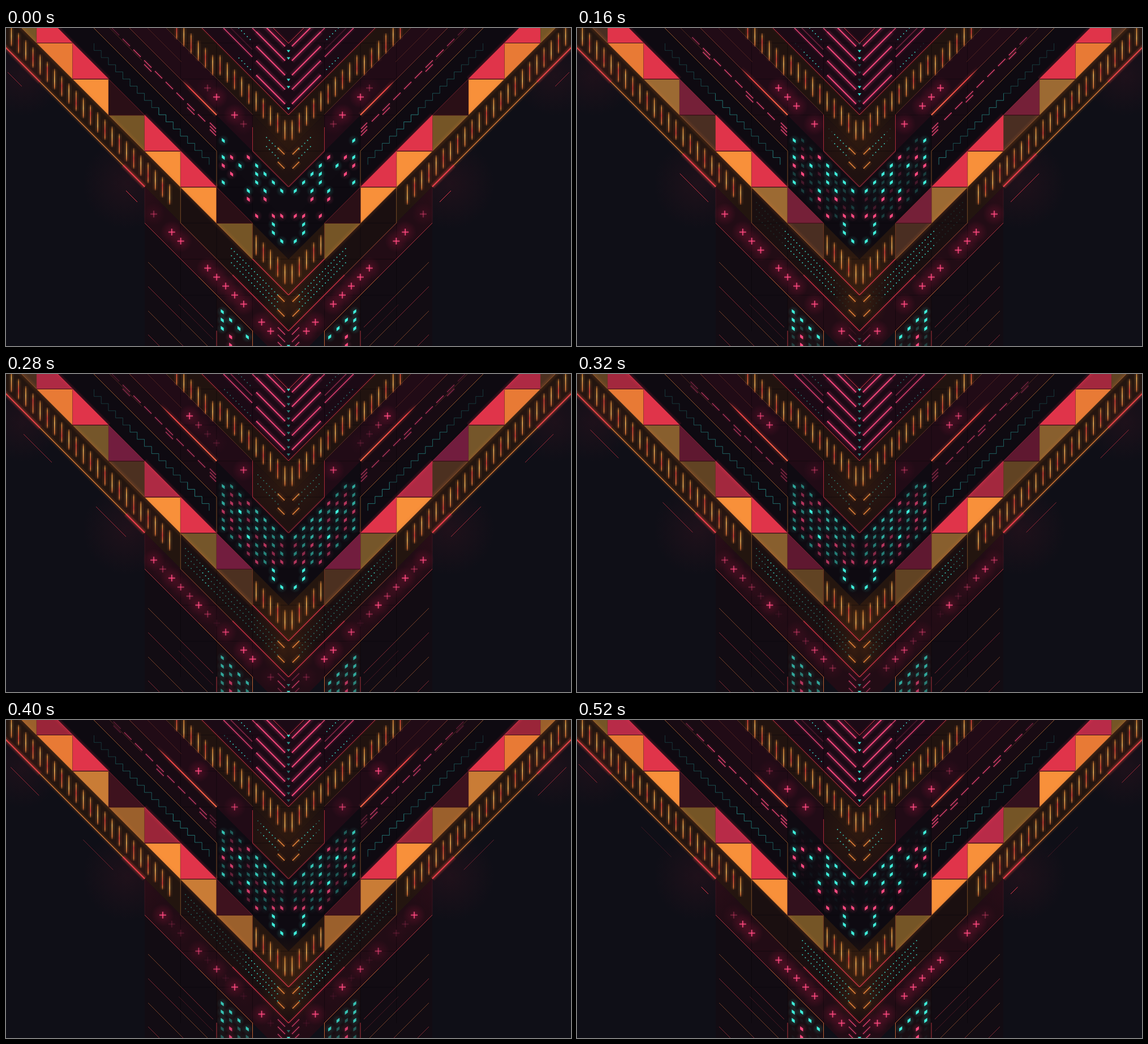
An HTML page with a canvas that plays this animation: 998x561 px, repeating every 560 ms.

```html
<!DOCTYPE html>
<html>
<head>
<meta charset="utf-8">
<style>
html, body { margin: 0; width: 100%; height: 100%; overflow: hidden; background: #0f0f17; }
canvas { display: block; }
</style>
</head>
<body>
<canvas id="stage" width="998" height="561"></canvas>
<script>
const ctx = document.getElementById('stage').getContext('2d');
const LOOP = 560, TILE = 63.55, STEP = TILE / 5, SPEED = 106 / LOOP;
const TIMES = [0, 80, 160, 280, 360, 440, 520, LOOP];
const PINK = '#ff4a80', RED = '#e83a4c', ORANGE = '#e8853a', CYAN = '#3ff0dc', TEAL = '#2c9c98';
const AMBER = '#f8903a', ROSE = '#e0344a';
let t = 0;

const clamp = v => Math.max(0, Math.min(1, v));
const mod = (a, n) => ((a % n) + n) % n;
const gx = c => 499 - TILE * (7 - c) + TILE * 0;
const gy = r => 26.5 + TILE * r;
const rgb = hex => [1, 3, 5].map(i => parseInt(hex.slice(i, i + 2), 16));

// Interpolates seven key values over the loop
function keyed(values, blend) {
  let i = 0;
  while (t >= TIMES[i + 1]) i++;
  return blend(values[i], values[(i + 1) % 7], (t - TIMES[i]) / (TIMES[i + 1] - TIMES[i]));
}
const level = values => keyed(values, (a, b, k) => a + (b - a) * k);
const tint = values => keyed(values, (a, b, k) => {
  const from = rgb(a), to = rgb(b);
  return `rgb(${from.map((v, i) => Math.round(v + (to[i] - v) * k))})`;
});

// Full between a and b, fading linearly outside, cyclic
function pulse(a, b, fade = 110) {
  return Math.max(...[t, t + LOOP].map(u => clamp(1 - Math.max(a - u, u - b, 0) / fade)));
}

function line(x1, y1, x2, y2, color, width = 1, alpha = 1, glow = 0) {
  if (alpha <= 0.01) return;
  ctx.strokeStyle = color;
  ctx.beginPath();
  ctx.moveTo(x1, y1);
  ctx.lineTo(x2, y2);
  for (let w = glow; w > 2; w -= 3) {
    ctx.globalAlpha = alpha * 0.07;
    ctx.lineWidth = width + w;
    ctx.stroke();
  }
  ctx.globalAlpha = alpha;
  ctx.lineWidth = width;
  ctx.stroke();
  ctx.globalAlpha = 1;
}
const diag = (off, x1, x2, ...style) => line(x1, x1 + off, x2, x2 + off, ...style);

function shape(points, color, alpha = 1) {
  ctx.globalAlpha = alpha;
  ctx.fillStyle = color;
  ctx.beginPath();
  points.forEach(([x, y]) => ctx.lineTo(x, y));
  ctx.fill();
  ctx.globalAlpha = 1;
}
function halo(x, y, r, color, alpha) {
  const g = ctx.createRadialGradient(x, y, 0, x, y, r);
  g.addColorStop(0, color);
  g.addColorStop(1, color + '00');
  ctx.globalAlpha = alpha;
  ctx.fillStyle = g;
  ctx.fillRect(x - r, y - r, 2 * r, 2 * r);
  ctx.globalAlpha = 1;
}
const band = (top, bottom, x1, x2, color) =>
  shape([[x1, x1 + top], [x2, x2 + top], [x2, x2 + bottom], [x1, x1 + bottom]], color);

function backdrop() {
  band(-600, 0, -10, 499, '#0f0b12');
  band(-155, -91, -10, 499, '#0e0a11');
  band(-218, -155, -10, 372, '#180b13');
  band(-283, -218, -10, 436, '#210b16');
  band(-346, -283, -10, 499, '#21130f');
  band(-600, -346, -10, 499, '#1b0a15');
  band(-283, -219, 436, 499, '#1f1110');
  band(-27, 35, -10, 308, '#23150f');
  band(-27, 35, 308, 499, '#1a0f10');
  band(-91, -28, 435, 499, '#25160f');
  band(35, 99, 245, 499, '#220c15');
  band(99, 330, 245, 372, '#120c13');
  band(99, 330, 372, 436, '#180d12');
  halo(215, 275, 80, '#601828', 0.2);
  halo(30, 85, 70, '#601828', 0.18);
  halo(490, 200, 60, '#603010', 0.2);
  halo(490, 435, 60, '#703810', 0.25);
  halo(490, 490, 40, '#703810', 0.3);
  for (let c = 4; c < 7; c++) {
    for (let r = 0; r < 8; r++) {
      line(gx(c), gy(r), gx(c + 1), gy(r), '#07060a', 1, 0.45);
      line(gx(c), gy(r), gx(c), gy(r + 1), '#07060a', 1, 0.45);
    }
  }
}

function triangles() {
  const olive = tint(['#755526', '#4a2e22', '#4a2e22', '#4c3020', '#755526', '#c06a32', '#755526']);
  const gold = tint([AMBER, AMBER, '#9c6a33', '#75562a', '#9a6731', AMBER, AMBER]);
  const wine = tint(['#2a0f16', '#4b1022', '#752038', '#721d3e', '#4c1222', '#30121a', '#33111d']);
  const blush = tint([ROSE, ROSE, ROSE, '#ae2a44', '#982538', '#9b2539', '#b82b48']);
  const lower = [olive, '#e87a35', gold, olive, AMBER, gold, olive];
  const upper = [blush, ROSE, wine, blush, ROSE, wine];
  lower.forEach((color, i) => {
    const x = gx(i - 1), y = gy(i - 1);
    shape([[x, y], [x + TILE, y], [x + TILE, y + TILE]], color);
    line(x, y, x + TILE, y + TILE, ORANGE, 1, 0.55, 10);
    line(x, y, x + TILE, y, '#3a1a14', 1.2, 0.9);
    line(x + TILE, y, x + TILE, y + TILE, '#6a3420', 1.2, 0.8);
  });
  upper.forEach((color, i) => {
    const x = gx(i), y = gy(i - 1);
    shape([[x, y], [x, y + TILE], [x + TILE, y + TILE]], color);
    line(x, y, x + TILE, y + TILE, RED, 1, color === wine ? 0.4 : 0.9, color === wine ? 0 : 9);
    line(x, y + TILE, x + TILE, y + TILE, '#3a1018', 1.2, 0.9);
  });
}

function tick(x, top) {
  const mid = 0.3 + 0.4 * mod(x * 0.37 + t / LOOP, 1);
  const g = ctx.createLinearGradient(0, top, 0, top + 37);
  g.addColorStop(0, '#e8853a40');
  g.addColorStop(0.15, '#e8903a');
  g.addColorStop(mid, Math.round(x / STEP) % 2 ? '#ffc060' : '#e8403c');
  g.addColorStop(0.88, '#f0803a');
  g.addColorStop(1, '#f0803a40');
  line(x, top, x, top + 37, g, 1.5, 0.95, 8);
}
function ticks() {
  for (let x = 9.5; x < 292; x += STEP) tick(x, x - 14);
  for (let x = 301.5; x < 370; x += STEP) tick(x, x - 318);
  for (let x = 378.2; x < 495; x += STEP) tick(x, x - 331);
  for (let x = 441.8; x < 495; x += STEP) tick(x, x - 77);
}

function outlines() {
  diag(35, -10, 245, ORANGE, 1.5, 0.9, 7);
  diag(35, -10, 60, RED, 2, 0.8, 9);
  diag(35, level([207, 198, 187, 212, 208, 205, 207]), 245, RED, 2, 1, 9);
  diag(-155, 150, 372, '#b06a34', 1, 0.8);
  diag(-183, 178, 240, '#a0562e', 1, 0.4);
  diag(-218, 215, 372, '#b8543a', 1, 0.6);
  diag(-250, 245, 310, '#a04a30', 1, 0.35);
  diag(-283, 280, 436, '#8a4830', 1, 0.55);
  diag(-346, 340, 499, RED, 1, 0.85, 4);
  diag(-472, 470, 499, RED, 1, 0.9, 5);
  line(372, 217, 372, 280, '#b06a34', 1, 0.7);
  line(435.5, level([175, 153, 153, 153, 153, 165, 175]), 435.5, 217, RED, 1, 0.7);
  diag(-218.5, 435.5, 499, RED, 1, 0.9, 4);
  line(435.5, 344, 435.5, 407, '#b04a34', 1, 0.8);
  diag(-28, 435.5, 499, RED, 1.2, 0.95, 5);
  line(308.3, 280, 308.3, 344, '#a86a34', 1, 0.7);
  diag(-27, 308, 436, ORANGE, 1, 0.3);
  diag(35.5, 308.3, 400, '#c0603a', 1, 0.8);
  diag(35.5, 400, 499, RED, 1.2, 0.9, 5);
  line(245, 280, 245, 344, '#8a2838', 1, 0.25);
  diag(99, 245, 340, '#c83c48', 1, 0.85);
  diag(99, 340, 435.5, '#d8703a', 1, 0.85);
  line(435.5, 534, 435.5, 561, '#d8703a', 1, 0.85);
  line(372, 534, 372, 561, '#c83c48', 1, 0.85);
  [162, 205, 248, 290].forEach((off, i) => {
    diag(off, 251, 310, i % 2 ? '#c83c48' : '#b8643a', 1, 0.6);
    diag(off, 310, 366, i % 2 ? '#b8643a' : '#c83c48', 1, 0.6);
  });
  diag(183, 305, 366, '#b03040', 1, 0.35);
}

function runners() {
  // Thin red dashes sliding up the outer edge
  for (const head of [212 - SPEED * t, 318 - SPEED * t]) {
    if (head < 232) diag(75, head, Math.min(232, head + 53), RED, 1, clamp((head - 90) / 110));
  }
  const u = t < 200 ? t + LOOP : t, left = Math.max(3, 84 - SPEED * u), right = 134 - SPEED * u;
  if (right > left) diag(75, left, right, RED, 1, 0.6);

  const head = t < 380 ? 312 - 0.14 * t : 259 + (t - 380) * 0.378;
  const g = ctx.createLinearGradient(head, 0, 372, 0);
  g.addColorStop(0, '#ff4a4000');
  g.addColorStop(0.2, '#f04444');
  g.addColorStop(1, '#ff6a48');
  diag(-218.5, Math.min(312, head), 372, g, 2, 1, 8);
}

function stairs() {
  for (let i = 0; i < 17; i++) {
    const x = 155.5 + i * STEP, y = 27 + i * 12.6;
    const wave = 1 - mod(x - 265 + SPEED * t, 106) / 140;
    const alpha = 0.3 + 0.5 * wave * clamp((x - 170) / 90);
    line(x, y, x, y + 12.6, TEAL, 1, alpha);
    if (i < 16) line(x, y + 12.6, x + STEP, y + 12.6, TEAL, 1, alpha);
  }
}

function dashes() {
  const strength = level([0.9, 0.9, 0.9, 0.7, 0.65, 0.85, 0.9]);
  const shift = 76 * t / LOOP;
  for (let i = 0; i < 16; i++) {
    const x = 187 + 19 * i - shift;
    if (x < 185 || x > 345) continue;
    const alpha = strength * clamp((x - 170) / 50);
    diag(-187, x, x + 13, PINK, 1.3, alpha, 5);
    if (i % 4 === 3) diag(-180, x, x + 13, PINK, 1.3, alpha, 5);
  }
  const triple = level([0.9, 0.9, 0.9, 0.6, 0.35, 0.3, 0.9]);
  [-193, -187, -181].forEach(off => diag(off, 360, 371, PINK, 1.4, triple, 5));

  for (let i = 0; i < 5; i++) {
    const off = -359 - 25.4 * i;
    diag(off, 442, 493, PINK, 2, 0.95, 9);
  }
  diag(-384, 384, 435, PINK, 1.5, 0.85, 6);
  diag(-397, 397, 435, PINK, 1.2, level([0.2, 0.1, 0.4, 0.5, 0.4, 0.6, 0.2]), 4);
  diag(-435, 435, 442, PINK, 1.5, 0.8, 6);

  [-269, -244, -9, 17].forEach(off => diag(off, 480, 492, ORANGE, 1.6, 1, 8));
  [48, 61, 74].forEach((off, i) =>
    diag(off, 480, 493, PINK, 1.3, i === 1 ? 0.8 : level([0.9, 0.1, 0.1, 0.4, 0.7, 0.8, 0.9]), 5));
}

function dots(off, x1, x2, head, length, dim, size = 1.7) {
  for (let x = x1; x <= x2; x += 5.08) {
    const lit = x >= head && x <= head + length;
    ctx.globalAlpha = lit ? 0.9 : dim;
    ctx.fillStyle = CYAN;
    ctx.fillRect(x - size / 2, x + off - size / 2, size, size);
  }
  ctx.globalAlpha = 1;
}
function dotRows() {
  const dim = level([0, 0, 0.15, 0.45, 0.45, 0.3, 0]);
  const bright = head => (t > 230 && t < 400 ? 999 : head);
  dots(-358.5, 386, 434, bright(level([408, 403, 398, 385, 382, 407, 408])), 32, dim);
  dots(-411, 411, 434, bright(level([411, 408, 404, 400, 400, 411, 411])), 28, dim);
  dots(-267, 445, 482, bright(level([459, 456, 453, 444, 444, 460, 459])), 28, dim);
  dots(-251, 445, 482, bright(level([459, 456, 453, 444, 444, 460, 459])), 24, dim);
  const head = (t < 400 ? 397 : 495) - SPEED * t;
  [-9, 3.5, 16].forEach(off => dots(off, 317, 482, head, t > 230 && t < 400 ? 18 : 92, dim));
}

function plus(x, y, alpha) {
  if (alpha < 0.02) return;
  halo(x, y, 20, '#c01848', alpha * 0.26);
  line(x - 6, y, x + 6, y, PINK, 1.5, alpha, 5);
  line(x, y - 6, x, y + 6, PINK, 1.5, alpha, 5);
}
function pluses() {
  const upper = [[275, 290], [340, 445], [70, 190], [510, 750], [150, 170], [430, 580], [70, 260]];
  const lower = [[60, 270], [340, 450], [490, 840], [490, 810], [160, 230], [270, 360], [500, 780],
    [430, 740], [500, 820], [400, 580], [500, 850], [275, 290], [390, 570], [500, 760]];
  upper.forEach(([a, b], i) => plus(324.2 + 15.9 * i, 74 + 15.9 * i, pulse(a, b)));
  lower.forEach(([a, b], i) => plus(261 + 15.88 * i, 328.3 + 15.88 * i, pulse(a, b)));
}

function gem(x, y, color, alpha) {
  if (alpha < 0.02) return;
  halo(x, y, 10, color, alpha * 0.2);
  shape([[x - 2.6, y - 4.6], [x + 2.6, y - 0.8], [x + 2.6, y + 4.6], [x - 2.6, y + 0.8]], color, alpha);
}
function gems() {
  const cyan = [[0, 0], [0, 2], [0, 5], [2, 3], [3, 6], [4, 3], [4, 4], [4, 5], [5, 4], [5, 6],
    [6, 5], [7, 6], [6, 10], [6, 11], [7, 12]];
  const pink = [[0, 3], [1, 2], [1, 4], [3, 2], [3, 7], [5, 7], [4, 9], [6, 9], [7, 9]];
  const lit = level([1, 1, 1, 0.65, 0.65, 0.9, 1]);
  const dim = level([0, 0, 0.2, 0.48, 0.42, 0.22, 0.04]);
  const taken = new Set([...cyan, ...pink].map(String));
  const place = ([c, r], color, alpha) => gem(383.8 + 14.75 * c, 198.5 + 14.8 * r, color, alpha);
  for (let c = 0; c < 8; c++) {
    for (let r = Math.max(0, c - 1); r <= Math.min(c + 5, 9); r++) {
      if (!taken.has([c, r].join())) place([c, r], (c * 3 + r * 5) % 7 < 3 ? PINK : CYAN, dim);
    }
  }
  cyan.forEach((p, i) => place(p, CYAN, i === 3 || i === 4 || i > 11 ? 1 : lit));
  pink.forEach(p => place(p, PINK, lit));

  for (let r = 0; r < 5; r++) {
    for (let c = 0; c <= Math.min(r, 3); c++) {
      const isPink = c === 1 && r > 2;
      const on = isPink || c === r || (c === 0 && r < 3);
      gem(382 + 14.75 * c, 500.5 + 14.8 * r, isPink ? PINK : CYAN, on ? lit : dim);
    }
  }
}

function arrows() {
  const spans = [[280, 440], [420, 760], [420, 740], [200, 230], [430, 440], [430, 660], [430, 740], [160, 180], [350, 365], [440, 600]];
  const dim = level([0, 0, 0.2, 0.5, 0.5, 0.25, 0]);
  const arrow = (y, alpha) => shape([[495.8, y - 2], [499, y - 2], [499, y + 2.5]], CYAN, alpha);
  spans.forEach(([a, b], i) => arrow(28 + 12.7 * i, Math.max(dim, 0.9 * pulse(a, b, 60))));
  arrow(549, dim);
  arrow(561, 0.9);
}

const layers = [backdrop, outlines, triangles, ticks, runners, stairs, dashes, dotRows, pluses, gems, arrows];

function frame(now) {
  t = Math.floor((now % LOOP) / 40) * 40;
  ctx.setTransform(1, 0, 0, 1, 0, 0);
  ctx.fillStyle = '#0f0f17';
  ctx.fillRect(0, 0, 998, 561);
  for (const side of [1, -1]) {
    ctx.setTransform(side, 0, 0, 1, side < 0 ? 998 : 0, 0);
    ctx.save();
    ctx.beginPath();
    ctx.rect(0, 0, 499, 561);
    ctx.clip();
    layers.forEach(draw => draw());
    ctx.restore();
  }
  requestAnimationFrame(frame);
}
requestAnimationFrame(frame);
</script>
</body>
</html>
```
